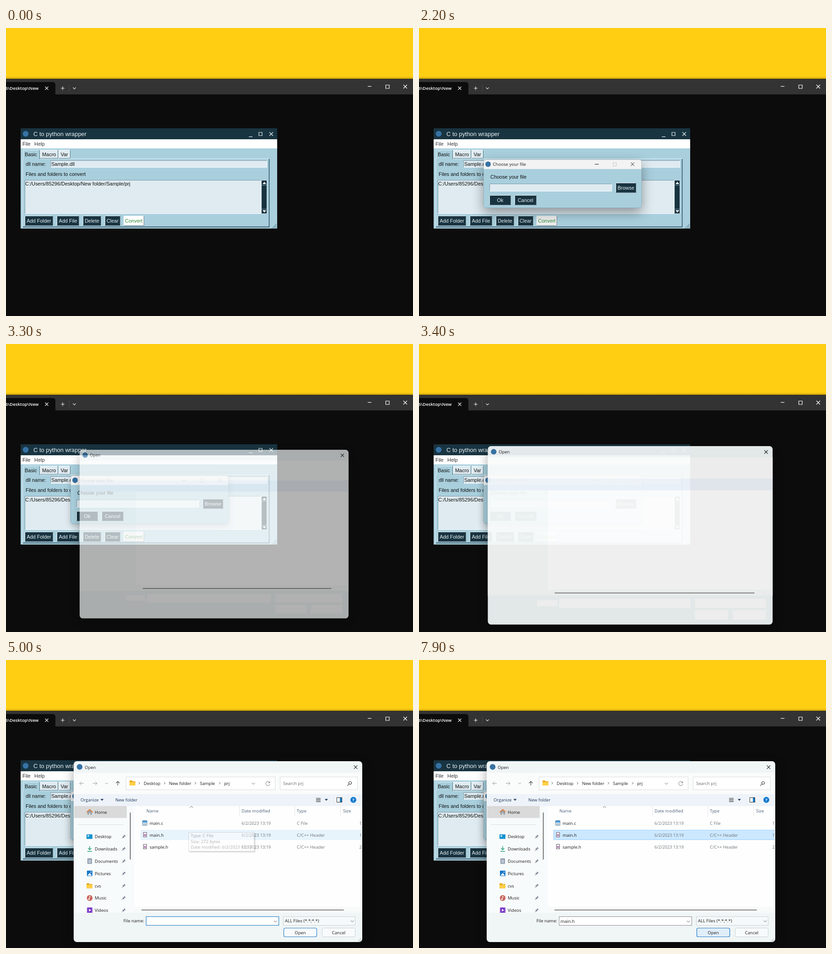
Recreate the animation shown at these times as an HTML page. Size 890 by 629 pixels, loop 8 s.

```html
<!DOCTYPE html>
<html lang="en">
<head>
<meta charset="utf-8">
<title>C to python wrapper</title>
<style>
html, body { margin: 0; width: 100%; height: 100%; overflow: hidden; background: #0c0c0c; }
svg { display: block; width: 890px; height: 629px; }
text { white-space: pre; }
.tk { font-family: "Liberation Sans", Arial, sans-serif; font-size: 10.95px; }
.ui { font-family: "Open Sans", "Noto Sans", sans-serif; font-size: 9.5px; }
#choosePane { filter: drop-shadow(0 10px 13px rgba(0,0,0,.38)); }
.idle #choosePane { filter: drop-shadow(0 4px 7px rgba(0,0,0,.22)); }
#openPane { filter: drop-shadow(0 8px 12px rgba(0,0,0,.34)); }
#tip rect { filter: drop-shadow(2px 2px 1px rgba(0,0,0,.35)); }
</style>
</head>
<body>
<svg id="stage" viewBox="0 0 890 629"></svg>
<script>
const LOOP = 8000;
const DARK = '#193441', PALE = '#dfebf1', BODY = '#a9cfdd', BLUE = '#3672a4';

// Shape helpers; boxes are given by their edges.
const box = (x1, y1, x2, y2, fill, more = '') =>
  `<rect x="${x1}" y="${y1}" width="${x2 - x1}" height="${y2 - y1}" fill="${fill}" ${more}/>`;
const frame = (x1, y1, x2, y2, fill, stroke, r = 0, more = '') =>
  box(x1 + .5, y1 + .5, x2 - .5, y2 - .5, fill, `stroke="${stroke}" rx="${r}" ${more}`);
const line = (d, stroke, w = 1, more = '') =>
  `<path d="${d}" fill="none" stroke="${stroke}" stroke-width="${w}" ${more}/>`;
const fill = (d, color, more = '') => `<path d="${d}" fill="${color}" ${more}/>`;
const dot = (x, y, r, color) => `<circle cx="${x}" cy="${y}" r="${r}" fill="${color}"/>`;
const tk = (x, y, s, color = '#111', more = '') => `<text class="tk" x="${x}" y="${y}" fill="${color}" ${more}>${s}</text>`;
const ui = (x, y, s, color = '#1b1b1b', more = '') => `<text class="ui" x="${x}" y="${y}" fill="${color}" ${more}>${s}</text>`;
const size = n => `style="font-size:${n}px"`;
const group = (id, inner, more = '') => `<g id="${id}" ${more}>${inner}</g>`;
const cross = (x, y, r, color, w = 1, more = '') =>
  line(`M${x - r} ${y - r}l${2 * r} ${2 * r}m0 ${-2 * r}l${-2 * r} ${2 * r}`, color, w, more);
const chevron = (x, y, r, color, w = 1) => line(`M${x - r} ${y - r / 2}l${r} ${r}l${r} ${-r}`, color, w);

const bevel = (x1, y1, x2, y2, a, b) =>
  line(`M${x1 + .5} ${y2 - .5}V${y1 + .5}H${x2 - .5}`, a) + line(`M${x2 - .5} ${y1 + .5}V${y2 - .5}H${x1 + .5}`, b);
const entry = (x1, y1, x2, y2) => box(x1, y1, x2, y2, PALE) + bevel(x1, y1, x2, y2, '#7b98a5', '#f4fafc');
const button = (x1, y1, x2, y2, s, bg = DARK, fg = '#e9f3f6') =>
  box(x1, y1, x2, y2, bg) + bevel(x1, y1, x2, y2, '#eef6f9', '#6c7d86') +
  tk((x1 + x2) / 2, (y1 + y2) / 2 + 4, s, fg, 'text-anchor="middle"');

function desktop() {
  return box(0, 0, 890, 112, '#ffcd12') + box(0, 106, 890, 111, 'url(#edge)') +
    box(0, 111, 890, 629, '#0c0c0c') + box(0, 111, 890, 145, '#333') + box(0, 111, 890, 112, '#282520') +
    fill('M0 118H102Q108 118 108 124V145H0Z', '#0c0c0c') +
    ui(71.5, 135, '6\\Desktop\\New', '#fff', 'text-anchor="end" font-weight="600" style="font-size:9.7px"') +
    cross(89, 131.5, 3.5, '#eee', 1.1) +
    line('M124 127.5v8M120 131.5h8', '#eee', 1.1) + line('M138.5 123v17', '#474747') +
    chevron(149.5, 131.5, 3.2, '#eee', 1.1) +
    line('M791 127.5h8', '#fff', 1.2) + line('M830.5 124.5h7.5v7.5h-7.5z', '#fff', 1.2) +
    cross(873, 128, 4, '#fff', 1.2);
}

function mainWindow() {
  const arrows = fill('M561 341h8l-4 -5zM561 398h8l-4 5z', '#fff');
  return box(32, 219, 593, 438, BODY) + box(32, 219, 593, 243, DARK) + dot(43, 231, 6.3, BLUE) +
    tk(60, 236, 'C to python wrapper', '#e8f1f4', size(12.9)) +
    line('M531 237.5h8', '#e8f1f4', 1.2) + line('M553 228h7v7h-7z', '#e8f1f4', 1.2) +
    cross(580, 231.5, 4, '#e8f1f4', 1.2) +
    box(32, 243, 593, 263, '#fff') + tk(36, 257, 'File', '#333') + tk(62, 257, 'Help', '#333') +
    line('M36.5 435V285.5H575.5', '#e4f1f6') + line('M575.5 286V434.5H37', '#24485a', 1.4) +
    box(74, 266, 114, 285, PALE) + bevel(74, 266, 114, 285, '#f5fafc', '#5b7b89') +
    box(115, 266, 141, 285, PALE) + bevel(115, 266, 141, 285, '#f5fafc', '#5b7b89') +
    box(37, 266, 73, 287, BODY) + line('M37.5 286V266.5H72', '#e4f1f6') + line('M73.5 267V286', '#456a7a') +
    tk(41, 280, 'Basic') + tk(79, 280, 'Macro') + tk(119.5, 280, 'Var') +
    tk(43, 301, 'dll name:') + entry(97, 289, 571, 305) + tk(99, 301, 'Sample.dll') +
    tk(43, 323, 'Files and folders to convert') + entry(41, 332, 558, 406) +
    tk(42, 344, 'C:/Users/85296/Desktop/New folder/Sample/prj') +
    box(558, 332, 571, 406, '#c5dce5') + box(559, 333, 570, 405, DARK) +
    line('M559 343.5h11M559 395.5h11', '#71909d') + arrows +
    button(41, 410, 103, 432, 'Add Folder') + button(111, 410, 160, 432, 'Add File') +
    button(168, 410, 208, 432, 'Delete') + button(216, 410, 250, 432, 'Clear') +
    group('convert', button(257, 410, 302, 432, 'Convert', '#efefef', '#2c8a34')) +
    group('convertHot', button(257, 410, 302, 432, 'Convert', '#fff', '#2c8a34')) +
    line('M582 437.5l10 -10M586 437.5l6 -6M590 437.5l2 -2', '#355a6a');
}

function chooseDialog() {
  return group('choosePane', box(141, 287, 487, 393, BODY, 'rx="6"')) +
    fill('M141 308V293Q141 287 147 287H481Q487 287 487 293V308Z', '#f3f3f3') +
    frame(141, 287, 487, 393, 'none', '#7f99a4', 6, 'stroke-opacity=".5"') +
    dot(151, 297.5, 6, BLUE) +
    group('chooseTitle', ui(161.5, 301, 'Choose your file', 'currentColor', size(9.6)) +
      line('M384.5 297.5h8.5', 'currentColor') + cross(467, 297.5, 3.8, 'currentColor')) +
    line('M424.5 294.5h7v7h-7z', '#c4c4c4') +
    tk(156, 328.5, 'Choose your file') + entry(154, 340, 422, 357) +
    group('chooseCaret', box(155.5, 341.5, 156.5, 356, '#111')) +
    button(430, 338, 475, 360, 'Browse') +
    group('browseHot', button(430, 338, 475, 360, 'Browse', '#e9f3f6', DARK)) +
    button(154, 365, 201, 387, 'Ok') + button(209, 365, 257, 387, 'Cancel');
}

const folder = (x, y) =>
  fill(`M${x} ${y + 2}q0 -2 2 -2h3l2 2h6v9h-13z`, '#e8a71c') + box(x, y + 3.5, x + 13, y + 11, '#ffcf48', 'rx="1"');

const navIcons = [
  y => box(176, y - 5, 189, y + 5, '#1592cf', 'rx="1"') + box(178, y - 3, 182, y, '#bfeaff'),
  y => line(`M183 ${y - 6}v8m-3.5 -3.5l3.5 3.5l3.5 -3.5M178 ${y + 5.5}h10`, '#1f9f70', 1.4),
  y => box(178, y - 6, 188, y + 6, '#8e9db0', 'rx="1"') + line(`M180 ${y - 2}h6m-6 2.5h6m-6 2.5h6`, '#fff'),
  y => box(177, y - 6, 189, y + 6, '#1577c9', 'rx="1"') + fill(`M178 ${y + 5}l5 -6l5 6z`, '#fff') + dot(186, y - 3, 1.2, '#fff'),
  y => folder(176, y - 5.5),
  y => dot(183, y, 6.3, '#c7665e') + line(`M182.5 ${y + 2.5}v-6l3 1`, '#fff', 1.1) + dot(181.3, y + 2.5, 1.5, '#fff'),
  y => box(177, y - 6, 189, y + 6, '#7a35c4', 'rx="1"') + fill(`M181.5 ${y - 3}l4.5 3l-4.5 3z`, '#fff') +
    line(`M178.5 ${y - 5}v10m9 -10v10`, '#c9a6ee', 1, 'stroke-dasharray="1.5 1.5"'),
];
const pin = y => `<g transform="translate(257 ${y}) rotate(45)">` +
  fill('M-2 -4.5h4v1l-.7 .6v2.4l1.7 1.7h-6l1.7 -1.7v-2.4l-.7 -.6z', '#7b8794') + line('M0 1v4', '#7b8794') + '</g>';

function nav() {
  const names = ['Desktop', 'Downloads', 'Documents', 'Pictures', 'cvs', 'Music', 'Videos'];
  const rows = names.map((name, i) => {
    const y = 385.7 + i * 26.8;
    return navIcons[i](y) + ui(194, y + 3.6, name) + pin(y + .5);
  }).join('');
  return box(149, 319, 264, 345, '#dadada') +
    fill('M178 332v6h3.500v-4h3v4h3.500v-6l-5 -4.500z', '#9aa3ab') + line('M176.500 332.500l6.500 -6l6.500 6', '#e27b35', 1.8) +
    ui(194, 335.5, 'Home') + line('M157 359.5h100', '#dedede') +
    `<g clip-path="url(#navClip)">${rows}</g>` + box(270.7, 333, 273, 436, '#868686', 'rx="1"');
}

const row = (y, id, bg, edge) => group(id, frame(294, y, 782, y + 22, bg, edge));
function files() {
  const list = [['main.c', 'C File', '1 KB'], ['main.h', 'C/C++ Header', '1 KB'], ['sample.h', 'C/C++ Header', '2 KB']];
  const grey = '#6f7378';
  const rows = list.map(([name, type, kb], i) => {
    const y = 356 + i * 26;
    const icon = i ? frame(300, y - 6, 308, y + 5, '#fff', '#6d5a70') + line(`M302.500 ${y - 2}v5m0 -2.500h3m0 -2.500v5`, '#80287a')
      : frame(298, y - 6, 309, y + 6, '#cfe5f6', '#6f91b0', 1) + box(299, y - 5, 308, y - 1, '#4e9ad5') + line(`M300 ${y + 2.5}h7`, '#8b7d65');
    return icon + ui(314, y + 3.5, name) + ui(515, y + 3.5, '6/2/2023 13:19', grey, size(9.2)) +
      ui(636, y + 3.5, type, grey) + ui(772.5, y + 3.5, kb, grey);
  }).join('');
  return row(345, 'hot0', '#e8f4fc', '#e4f1fa') + row(371, 'hot1', '#e8f4fc', '#e4f1fa') +
    row(371, 'picked', '#cce8ff', '#99d1ff') + row(397, 'hot2', '#e8f4fc', '#e4f1fa') + rows;
}

function openContent() {
  const navy = '#1e3a5c', head = '#4c607a', grey = '#9a9a9a';
  const header = [['Name', 307], ['Date modified', 515], ['Type', 636], ['Size', 737]]
    .map(([s, x]) => ui(x, 333, s, head)).join('');
  const crumbs = [['Desktop', 301], ['New folder', 356.5], ['Sample', 424], ['prj', 477]]
    .map(([s, x]) => ui(x, 272.7, s) + line(`M${x - 11} 266.500l2.500 2.500l-2.500 2.500`, '#555')).join('');
  return line('M170 269.500h-9m4 -4l-4 4l4 4M190 269.500h9m-4 -4l4 4l-4 4', grey) + chevron(220, 269.5, 3, grey) +
    line('M244.500 274v-9m-4 4l4 -4l4 4', '#444', 1.1) +
    frame(262, 255, 589, 284, '#fff', '#dcdcdc') + folder(270, 263) + crumbs + chevron(541, 270, 3.3, '#666') +
    line('M576.500 268a4.500 4.500 0 1 0 .3 3M576.800 265v3.300h-3.300', '#777') +
    frame(599, 255, 769, 284, '#fff', '#dcdcdc') + ui(606, 272.7, 'Search prj', '#6b6b6b') +
    '<circle cx="752.500" cy="268.500" r="3" fill="none" stroke="#444" stroke-width="1.200"/>' + line('M750.300 270.700l-4 4', '#444', 1.2) +
    ui(163, 309, 'Organize', navy) + fill('M206.500 303.500h7l-3.500 4z', navy) + ui(239, 309, 'New folder', navy) +
    line('M678 302h10m-10 2.500h10m-10 2.500h10m-10 2.500h10', '#333') + fill('M697 303.500h7l-3.500 4z', navy) +
    frame(723, 300, 735, 311, '#fff', '#333') + box(730, 301, 734, 310, '#1b7fc9') +
    dot(759.5, 305.5, 6.5, '#1379cf') + ui(759.5, 309, '?', '#fff', 'text-anchor="middle" font-weight="700"') +
    nav() + header + line('M510.500 319v23M631.500 319v23M731.500 319v23', '#e4e4e4') +
    line('M402 322.500l3.500 -3l3.500 3', '#666') +
    group('rows', files(), 'clip-path="url(#listClip)"') +
    group('bar', box(286, 543, 774, 550, '#eeeeee', 'rx="3"') + box(296, 543.5, 739, 549, '#858585', 'rx="2.500"') +
      fill('M292 543.500v5l-4 -2.500zM768 543.500v5l4 -2.500z', '#777')) +
    ui(302, 573, 'File name:', '#1b1b1b', 'text-anchor="end"') +
    frame(306, 560, 597, 580, '#fff', '#8c8c8c') +
    group('focus', frame(306, 560, 597, 580, '#fff', '#2f86cc', 0, 'stroke-width="1.200"')) +
    group('dropHot', box(582, 561, 596, 579, '#e5f1fb')) + group('dropEdge', box(582, 561, 583, 579, '#7eb4e0')) +
    chevron(589, 571, 3.3, '#555') + group('fileCaret', box(309.5, 564, 310.5, 578, '#111')) +
    group('fileText', ui(309.5, 574, 'main.h')) +
    frame(606, 560, 764, 580, '#f5f9fa', '#ccd2d5') +
    group('typeHot', frame(606, 560, 764, 580, '#e5f1fb', '#6faee0')) +
    ui(610, 573.3, 'ALL Files (*.*;*.*)') + chevron(757, 570.5, 3.3, '#666') +
    frame(607, 585, 680, 605, '#f8fbfc', '#2a80c6', 3, 'stroke-width="1.200"') +
    group('openHot', frame(607, 585, 680, 605, '#e0eef9', '#2a80c6', 3, 'stroke-width="1.200"')) +
    ui(643.5, 598.7, 'Open', '#1b1b1b', 'text-anchor="middle"') +
    frame(691, 585, 764, 605, '#f8fbfc', '#cdd3d6', 3) + ui(727.5, 598.7, 'Cancel', '#1b1b1b', 'text-anchor="middle"') +
    line('M770 613.500h6M772.500 611h3.500M775 608.500h1', '#a9adb0', 1.3, 'stroke-dasharray="1.300 1.200"');
}

function openDialog() {
  const blanks = [[257, 562, 302, 575], [306, 559, 597, 579], [607, 559, 764, 579], [607, 584, 680, 605], [691, 584, 764, 605]]
    .map(b => box(...b, '#fcfcfc')).join('');
  const tip = ['Type: C File', 'Size: 272 bytes', 'Date modified: 6/2/2023 13:19']
    .map((s, i) => ui(404, 387 + i * 12.5, s, '#555')).join('');
  return group('openPane', box(148, 221, 779, 616, '#f0f5f6', 'rx="7"')) +
    box(148, 246, 779, 293, '#fafbfb') + box(148, 293, 779, 319, '#eef3f9') +
    box(148, 319, 281, 552, '#f8fbfb') + box(281, 319, 779, 552, '#f8fafa') + box(281, 319, 774, 539, '#fefefe') +
    dot(161, 233.5, 6.2, BLUE) + ui(172, 237.5, 'Open') + cross(764.5, 234, 3.8, '#222', 1.1) +
    box(296, 545, 739, 547, '#858585', 'rx="1"') +
    group('blanks', blanks) + group('content', openContent()) +
    group('tip', frame(399, 376, 543, 418, '#fff', '#b4b4b4') + tip);
}

const clip = (id, ...b) => `<clipPath id="${id}">${box(...b, '#000')}</clipPath>`;
const stage = document.getElementById('stage');
stage.innerHTML = `<defs><linearGradient id="edge" x2="0" y2="1"><stop stop-color="#000" stop-opacity="0"/>
  <stop offset="1" stop-color="#000" stop-opacity=".22"/></linearGradient>` +
  clip('navClip', 149, 320, 268, 552) + clip('listClip', 282, 343, 778, 539) + '</defs>' +
  desktop() + mainWindow() + group('choose', chooseDialog()) + group('open', openDialog());

// Opacity of each part: pairs of start time and value, held until the next pair.
const opacity = {
  convertHot: [0, 1, 1500, 0],
  choose: [0, 0, 1500, .4, 1600, .9, 1700, 1],
  chooseCaret: [0, 1, 2200, 0, 2500, 1, 3100, 0],
  browseHot: [0, 0, 2900, 1, 3100, 0],
  open: [0, 0, 3300, .69, 3400, .94, 3500, 1],
  blanks: [0, 1, 3500, 0],
  content: [0, 0, 3500, 1],
  rows: [0, 0, 3600, 1],
  hot0: [0, 0, 3900, 1, 5000, 0],
  hot1: [0, 0, 5000, 1, 5500, 0],
  hot2: [0, 0, 5900, 1, 6000, 0, 7300, 1, 7400, .5, 7500, 0],
  picked: [0, 0, 5500, 1],
  tip: [0, 0, 4900, .3, 5000, .45, 5100, .32, 5200, .16, 5300, 0],
  focus: [0, 1, 5600, 0],
  fileCaret: [0, 0, 3700, 1, 3900, 0, 4400, 1, 4900, 0, 5400, 1, 5600, 0],
  fileText: [0, 0, 5600, 1],
  bar: [0, 0, 6800, 1, 6900, 0],
  dropHot: [0, 0, 6900, 1, 7300, 0],
  dropEdge: [0, 0, 7100, 1, 7300, 0],
  typeHot: [0, 0, 7700, 1, 7800, 0],
  openHot: [0, 0, 7800, .5, 7900, 1],
};
const chooseScale = [0, .93, 1600, .99, 1700, 1];
const openScale = [0, .932, 3400, .987, 3500, 1];

function at(steps, t) {
  let i = steps.length - 2;
  while (i > 0 && steps[i] > t) i -= 2;
  return steps[i + 1];
}
const part = id => document.getElementById(id);

function draw(t) {
  for (const id in opacity) {
    const a = at(opacity[id], t), style = part(id).style;
    style.opacity = a;
    style.display = a ? '' : 'none';
  }
  const c = at(chooseScale, t), s = at(openScale, t), k = (1 - s) / .068;
  part('choose').setAttribute('transform', `translate(314 340) scale(${c}) translate(-314 -340)`);
  part('choose').setAttribute('class', t < 3100 ? '' : 'idle');
  part('chooseTitle').style.color = t < 3100 ? '#1b1b1b' : '#a5a5a5';
  part('open').setAttribute('transform', `translate(${148 + 13 * k} ${221 + 10 * k}) scale(${s}) translate(-148 -221)`);
}

const start = performance.now();
function tick() {
  draw((performance.now() - start) % LOOP);
  requestAnimationFrame(tick);
}
tick();
</script>
</body>
</html>
```
